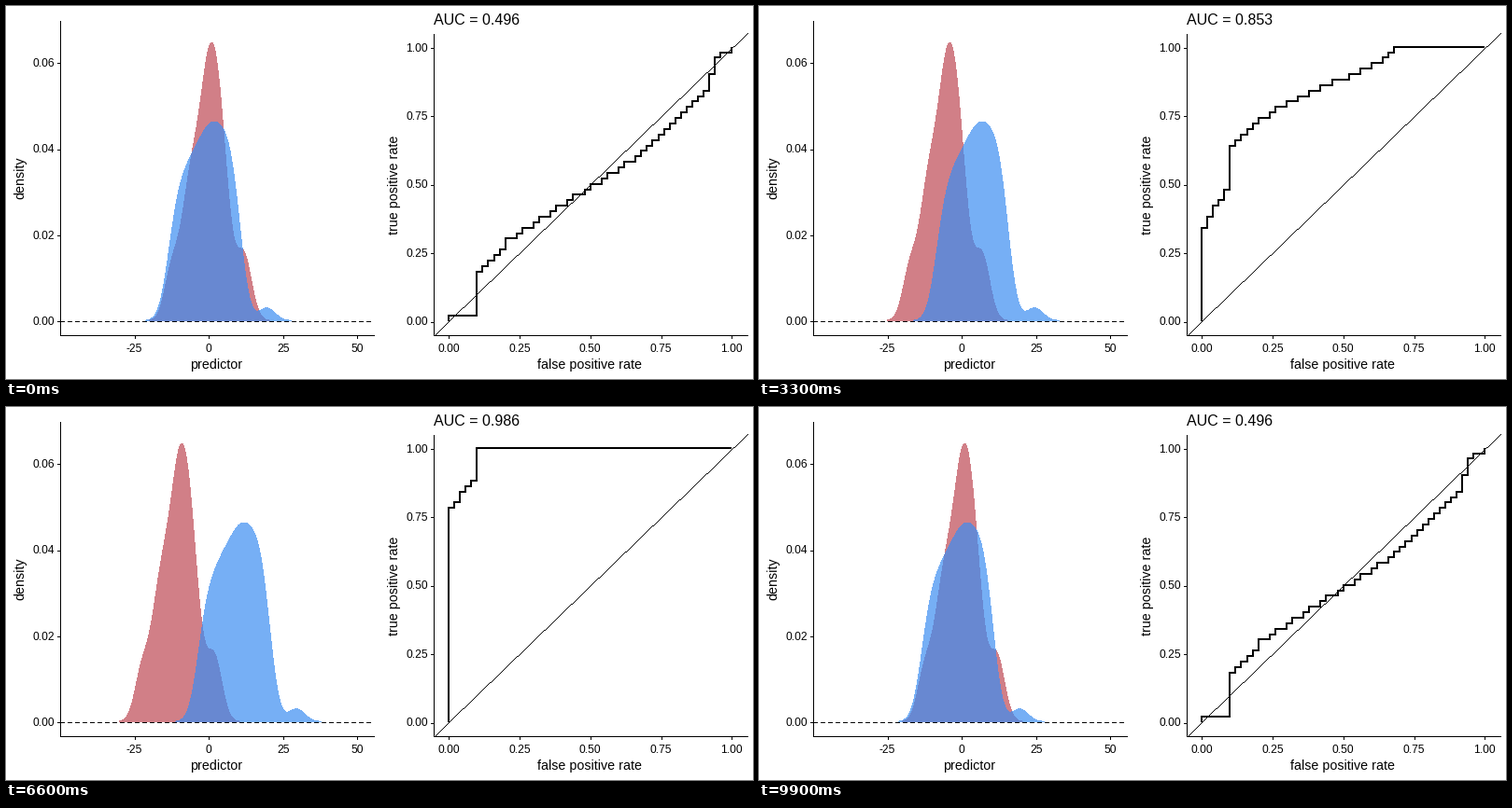
Write a matplotlib script that moves like this. It is 800 px wide and 400 px high and loops after 10000 ms.

```python
import matplotlib.pyplot as plt
import numpy as np
from matplotlib.animation import FuncAnimation
from matplotlib.patches import Polygon

PX = 0.72                     # points per pixel at 100 dpi
RED = (190 / 255, 73 / 255, 84 / 255)
BLUE = (60 / 255, 141 / 255, 242 / 255)
SIZE = 50                     # observations per class

SHIFTS = [0, 2.5, 5, 7.5, 10, 20]
AUCS = ["0.496", "0.694", "0.853", "0.950", "0.986", "1.000"]
STARTS = [9, 26, 43, 59, 76, 92]
STEPS = 8

plt.rcParams["font.family"] = "Liberation Sans"
fig = plt.figure(figsize=(8, 4), dpi=100, facecolor="white")
ax = fig.add_axes([0, 0, 1, 1])
ax.set_xlim(0, 800)
ax.set_ylim(400, 0)
ax.axis("off")


def density_px(x, y):
    return 217.2 + 3.185 * np.asarray(x), 337.4 - 4622 * np.asarray(y)


def roc_px(x, y):
    return 474 + 303.4 * np.asarray(x), 337.6 - 293.9 * np.asarray(y)


class Group:
    """A sample bent through a few ranked values, drawn as a kernel density."""

    def __init__(self, sign, lag, bw, color, ranks, values):
        self.sign, self.lag, self.bw = sign, lag, bw
        self.sample = np.interp(np.arange(1, SIZE + 1), ranks, values)
        lo, hi = self.sample.min() - 3 * bw, self.sample.max() + 3 * bw
        self.u = np.linspace(lo, hi, 400)
        self.sway = np.sin(np.pi * (self.u - lo) / (hi - lo))
        self.patch = Polygon([[0, 0], [1, 1], [1, 0]], facecolor=color,
                             alpha=0.7, linewidth=0, antialiased=False)
        ax.add_patch(self.patch)

    def moved(self, shift):
        return self.sample + self.sign * shift

    def kde(self, u):
        z = (u[:, None] - self.sample) / self.bw
        norm = SIZE * self.bw * np.sqrt(2 * np.pi)
        return np.exp(-z ** 2 / 2).sum(axis=1) / norm

    def update(self, s0, s1, t):
        u, sign = self.u, self.sign
        v = u + sign * self.lag * (s0 - s1) * self.sway
        x = (1 - t) * (u + sign * s0) + t * (v + sign * s1)
        y = (1 - t) * self.kde(u) + t * self.kde(v)
        x = np.concatenate([x, [x[-1], x[0]]])
        y = np.concatenate([y, [0, 0]])
        self.patch.set_xy(np.column_stack(density_px(x, y)))


red = Group(-1, 0.50, 2.4, RED,
            [1, 5, 6, 11, 20, 32, 46, 48, 50],
            [13.2, 10.2, 6.8, 4.3, 1.6, -1.6, -8.4, -12.4, -12.8])
blue = Group(1, 0.35, 2.75, BLUE,
             [1, 2, 7, 17, 29, 40, 45, 50],
             [19.5, 10.2, 7.9, 3.4, -1.6, -7, -10, -13])


def roc(shift):
    """False and true positive rates as the threshold falls."""
    scores = np.concatenate([red.moved(shift), blue.moved(shift)])
    hit = np.argsort(-scores) >= SIZE
    rates = np.cumsum(np.column_stack([~hit, hit]), axis=0) / SIZE
    return np.vstack([[0, 0], rates])


rocs = [roc(s) for s in SHIFTS]


# ---- fixed parts ----
def line(x0, y0, x1, y1, **kw):
    """One-pixel line through whole pixel columns and rows."""
    ax.plot([x0 + 0.4, x1 + 0.4], [y0 + 0.6, y1 + 0.6], color="black",
            linewidth=PX, antialiased=False, solid_capstyle="butt", **kw)


def text(x, y, s, size, ha="center", **kw):
    return ax.text(x, y, s, fontsize=size * PX, ha=ha, va="baseline",
                   rotation_mode="anchor", color="black", **kw)


def frame_axes(left, right, top, xticks, yticks, xname, yname):
    bottom = 352
    line(left, top, left, bottom)
    line(left, bottom, right, bottom)
    for x, label in xticks:
        line(round(x), bottom, round(x), bottom + 3)
        text(x, 370.7, label, 12)
    for y, label in yticks:
        line(left - 3, round(y), left, round(y))
        text(left - 6, y + 4.8, label, 12, ha="right")
    text((left + right) / 2 - 0.8, 388.7, xname, 14.3)
    text(left - 38.2, (top + bottom) / 2 + 1, yname, 14.3, rotation=90)


line(58, 337, 393, 337, linestyle=(0, (5, 3)), dash_capstyle="butt", zorder=3)
frame_axes(58, 394, 15,
           [(density_px(v, 0)[0], str(v)) for v in (-25, 0, 25, 50)],
           [(density_px(0, v)[1], f"{v:.2f}") for v in (0, .02, .04, .06)],
           "predictor", "density")

quarters = np.linspace(0, 1, 5)
frame_axes(458, 794, 29,
           [(roc_px(v, 0)[0], f"{v:.2f}") for v in quarters],
           [(roc_px(0, v)[1], f"{v:.2f}") for v in quarters],
           "false positive rate", "true positive rate")

# chance line, one pixel per column
cols = np.arange(459, 794)
rows = np.floor(np.interp(cols, [459, 793], [352, 29.5]))
ax.plot(cols + 0.5, rows + 0.5, ",", color="black", antialiased=False)

curve, = ax.plot([], [], color="black", linewidth=2 * PX, antialiased=False,
                 solid_joinstyle="miter", solid_capstyle="butt", zorder=3)
title = text(458, 20, "", 16, ha="left")


# ---- motion ----
def phase(n):
    """States on both sides of frame n and the progress between them."""
    i = sum(n >= s for s in STARTS) - 1
    if i < 0:
        return 0, 0, 0.0
    t = min(n - STARTS[i] + 1, STEPS) / STEPS
    return i, (i + 1) % len(STARTS), t


def draw(n):
    a, b, t = phase(n)
    if t == 1:
        a, t = b, 0.0
    for g in (red, blue):
        g.update(SHIFTS[a], SHIFTS[b], t)
    pts = (1 - t) * rocs[a] + t * rocs[b]
    curve.set_data(*roc_px(pts[:, 0], pts[:, 1]))
    title.set_text("AUC = " + AUCS[b if t >= 0.5 else a])
    return [red.patch, blue.patch, curve, title]


anim = FuncAnimation(fig, draw, frames=100, interval=100, repeat=True,
                     repeat_delay=0, init_func=lambda: draw(0), blit=False)
plt.show()
```
